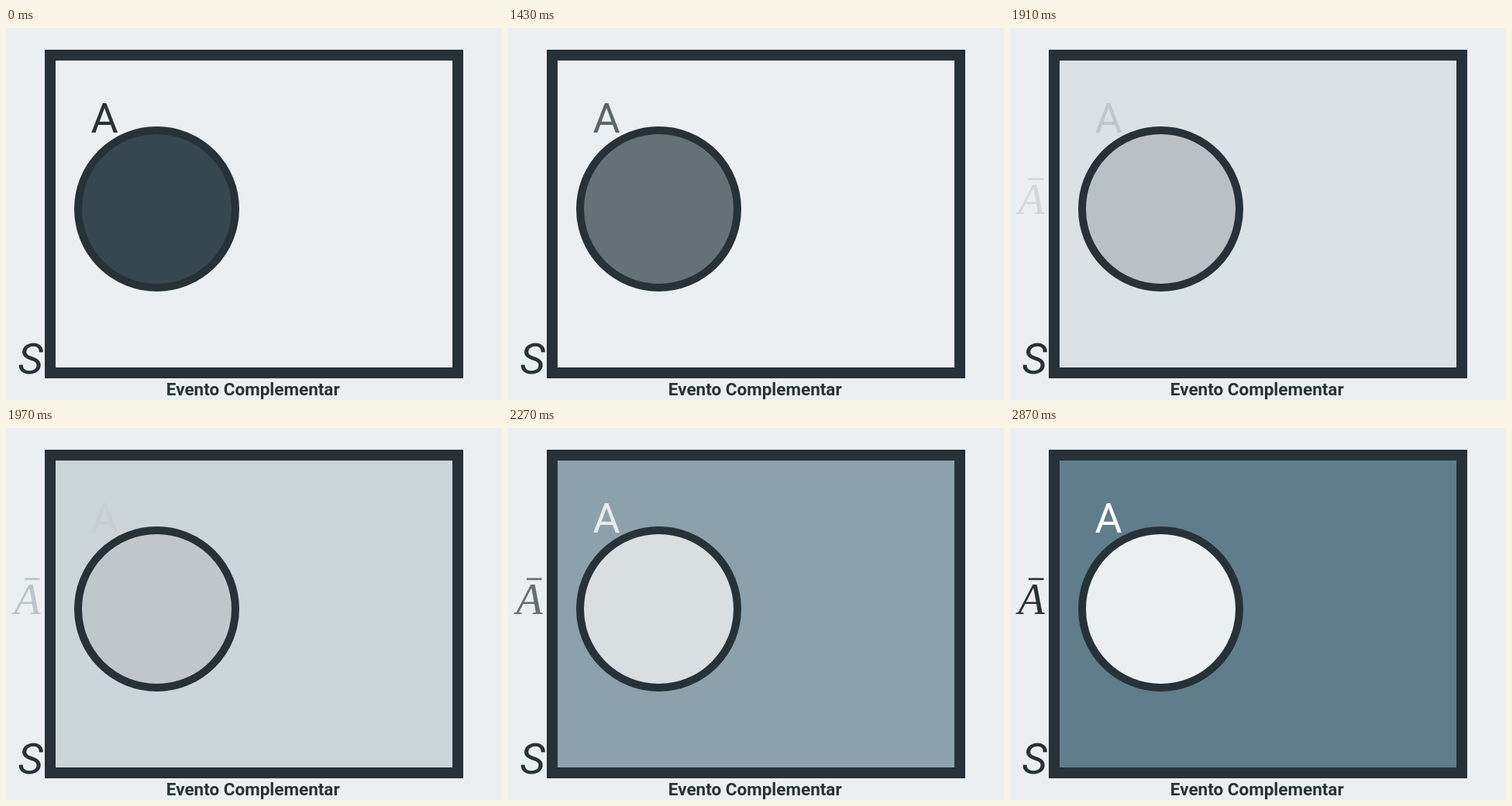
These frames come from a looping animation (640x480 px, 4140 ms). An HTML page:

```html
<!DOCTYPE html>
<html lang="pt">
<head>
<meta charset="utf-8">
<title>Evento Complementar</title>
<style>
  html, body { margin: 0; width: 100%; height: 100%; overflow: hidden; background: #ebeff1; }
  svg { display: block; width: 100%; height: 100%; }
  text { font-family: Roboto, Arial, sans-serif; fill: #263238; }
  .math { font: italic 56px "Liberation Serif", "Times New Roman", serif; }
</style>
</head>
<body>
<svg viewBox="0 0 640 480">
  <rect id="space" x="57" y="35" width="526" height="410" stroke="#263238" stroke-width="14"/>
  <circle id="event" cx="194.5" cy="233.5" r="101.5" stroke="#263238" stroke-width="10"/>
  <text id="label" x="109.4" y="135" font-size="54">A</text>
  <text x="15.5" y="446" font-size="56" font-style="italic">S</text>
  <g id="complement">
    <text class="math" x="10.5" y="239.5">A</text>
    <rect x="24" y="193.6" width="19.5" height="2.6" fill="#263238"/>
  </g>
  <text x="206.8" y="474" font-size="22.5" font-weight="700">Evento Complementar</text>
</svg>
<script>
  const LOOP = 4140, START = 1130, END = 2870, STEP = 60;
  const PAPER = [235, 239, 241], INK = [38, 50, 56], SLATE = [55, 71, 79];
  const BLUE = [96, 125, 139], WHITE = [255, 255, 255];
  const [space, eventDisc, label, complement] =
    ["space", "event", "label", "complement"].map(id => document.getElementById(id));

  const clamp = v => Math.min(1, Math.max(0, v));
  const mix = (a, b, p) => `rgb(${a.map((v, i) => Math.round(v + (b[i] - v) * p))})`;
  const bez = (a, b, s) => 3 * a * s * (1 - s) ** 2 + 3 * b * s * s * (1 - s) + s ** 3;

  // cubic-bezier(.25, .1, .25, 1), solved by bisection
  function ease(x) {
    let lo = 0, hi = 1;
    for (let i = 0; i < 24; i++) {
      const mid = (lo + hi) / 2;
      if (bez(0.25, 0.25, mid) < x) lo = mid; else hi = mid;
    }
    return bez(0.1, 1, lo);
  }

  const easeOut = x => 1 - (1 - x) ** 2;

  function draw(time) {
    let fade = 0, fill = 0;
    if (time >= END) {
      fade = fill = 1;
    } else if (time >= START) {
      const t = START + Math.floor((time - START) / STEP) * STEP;
      fade = ease(clamp((t - 1090) / 1900));
      fill = easeOut(clamp((t - 1853) / 960));
    }
    eventDisc.setAttribute("fill", mix(SLATE, PAPER, fade));
    label.style.fill = mix(INK, WHITE, fade);
    space.setAttribute("fill", mix(PAPER, BLUE, fill));
    complement.setAttribute("opacity", fill);
  }

  const origin = performance.now();
  function tick() {
    draw((performance.now() - origin) % LOOP);
    requestAnimationFrame(tick);
  }
  tick();
</script>
</body>
</html>
```
